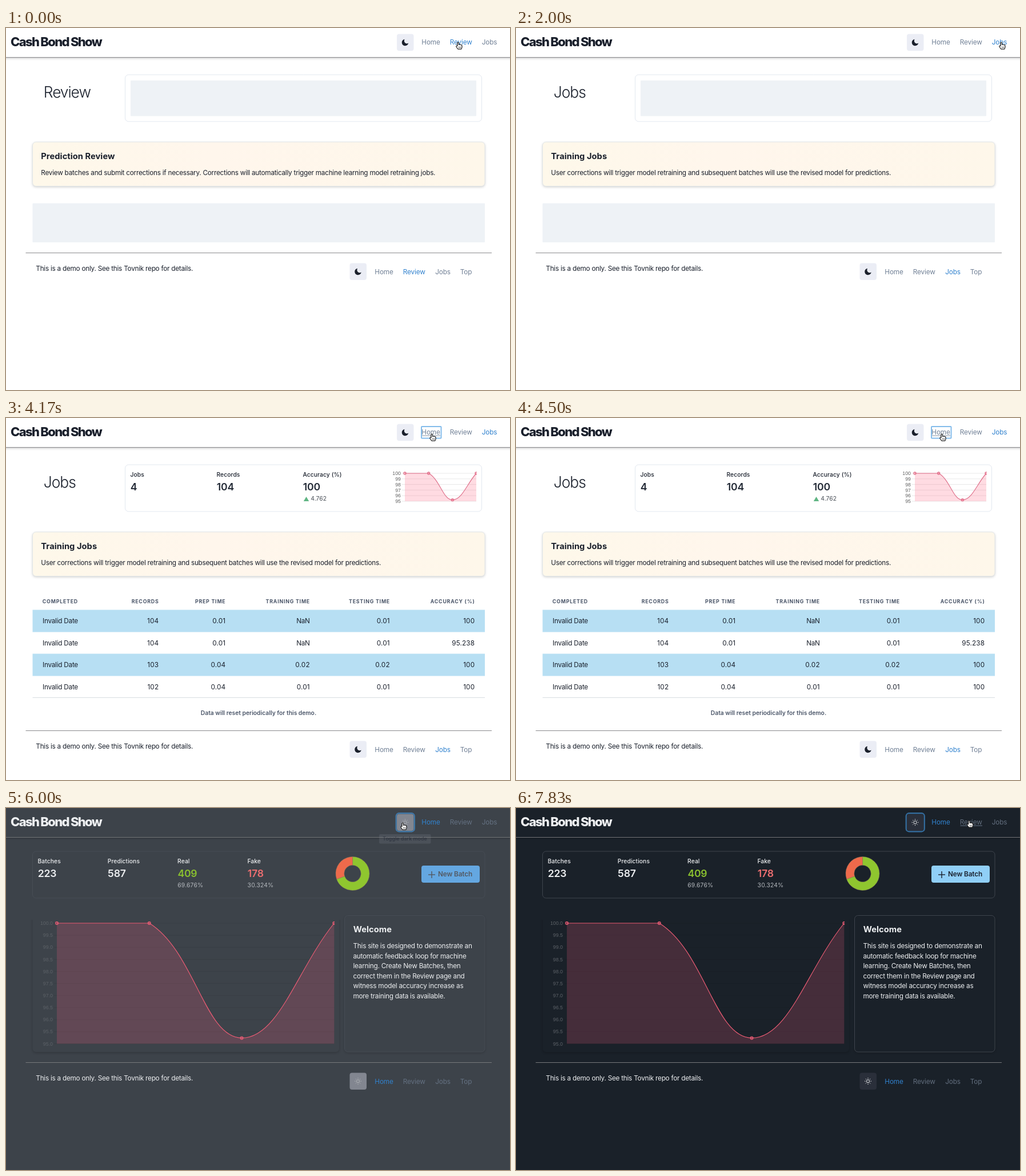
An HTML page with a canvas for the animation above (8 s loop, 882 by 635 pixels).

```html
<!DOCTYPE html>
<html lang="en">
<head>
<meta charset="utf-8">
<title>Cash Bond Show</title>
<style>
  html, body { margin: 0; width: 100%; height: 100%; overflow: hidden; background: #fff; }
  canvas { display: block; width: 882px; height: 635px; }
</style>
</head>
<body>
<canvas id="stage" width="882" height="635"></canvas>
<script>
const ctx = document.getElementById('stage').getContext('2d');
const LOOP = 8000, STEP = 1000 / 6;
const REVIEW_READY = 365, JOBS_OPEN = 1940, JOBS_READY = 2300, HOME_OPEN = 4510, DARK_AT = 5870;
const UI = 'Inter, "Open Sans", sans-serif';
const CHART_FONT = '"Liberation Sans", Arial, sans-serif';
const BODY = 11.76, SMALL = 10.29, TINY = 8.82;
const TRACK = -0.245, DIGIT_TRACK = 0.15;
const HAND = new Path2D('M-2.8 1L-2.8 -5Q-1.8 -6.6 -.8 -5L-.8 -1.5Q2 -2.4 4.6 -.6Q5.4 2.5 3.6 5.8L-2 5.8Q-4 3.2 -5 1.2Q-4.6 -.4 -2.8 1Z');
const FINGERS = new Path2D('M-.6 1.6L-.6 4.2M1 1.6L1 4.2M2.6 1.6L2.6 4.2');
const ARROW = new Path2D('M-2 -5L-2 4.5L.2 2.4L1.9 6L3.4 5.4L1.8 1.9L4.8 1.9Z');
const CURSOR_PATH = [
  [0, 793, 31], [700, 793, 31], [1000, 851, 31], [1170, 851, 31], [1400, 864, 13],
  [1700, 851, 31], [3200, 851, 31], [3600, 800, 30], [3950, 747, 34], [5000, 747, 34],
  [5170, 717, 32], [5400, 696, 32], [7200, 696, 32], [7700, 796, 28], [8000, 796, 28]
];
const ACCURACY = [100, 100, 95.238, 100];
const LINKS = { Home: [728, 760], Review: [777.5, 816], Jobs: [833.5, 859] };

// Per-frame theme state
let now = 0, dark = false, bgMix = 0, btnMix = 0;

const clamp = v => Math.max(0, Math.min(1, v));
const soft = u => 1 - Math.pow(1 - clamp(u), 2.4);
const outQuart = u => 1 - Math.pow(1 - clamp(u), 4);
const mix = (a, b, k) => `rgb(${a.map((v, i) => Math.round(v + (b[i] - v) * k))})`;
const ink = () => dark ? '#edeff1' : '#1a202c';
const edge = () => dark ? mix([120, 125, 132], [62, 68, 77], bgMix) : '#e2e8f0';
const pageFill = () => mix([255, 255, 255], [26, 33, 41], bgMix);

function text(str, x, y, o = {}) {
  ctx.font = `${o.weight || 400} ${o.size || BODY}px ${o.family || UI}`;
  ctx.letterSpacing = `${o.track === undefined ? TRACK : o.track}px`;
  ctx.textAlign = o.align || 'left';
  ctx.fillStyle = o.color || ink();
  ctx.fillText(str, x, y);
}

function box(x0, y0, x1, y1, r, fill, stroke, width = 1) {
  ctx.beginPath();
  ctx.roundRect(x0, y0, x1 - x0, y1 - y0, r);
  if (fill) { ctx.fillStyle = fill; ctx.fill(); }
  if (stroke) { ctx.strokeStyle = stroke; ctx.lineWidth = width; ctx.stroke(); }
}

function shadowBox(...args) {
  ctx.save();
  ctx.shadowColor = 'rgba(0,0,0,0.2)';
  ctx.shadowBlur = 4;
  ctx.shadowOffsetY = 1.5;
  box(...args);
  ctx.restore();
}

function hline(x0, x1, y, color, width = 1) {
  ctx.fillStyle = color;
  ctx.fillRect(x0, y - width / 2, x1 - x0, width);
}

function faded(alpha, draw) {
  ctx.save();
  ctx.globalAlpha = alpha;
  draw();
  ctx.restore();
}

function cursorAt(t) {
  let i = 1;
  while (i < CURSOR_PATH.length - 1 && CURSOR_PATH[i][0] < t) i++;
  const [t0, x0, y0] = CURSOR_PATH[i - 1], [t1, x1, y1] = CURSOR_PATH[i];
  const u = clamp((t - t0) / (t1 - t0)), e = u * u * (3 - 2 * u);
  return [x0 + (x1 - x0) * e, y0 + (y1 - y0) * e];
}

function linkUnder([x, y]) {
  if (y < 17 || y > 40) return '';
  return Object.keys(LINKS).find(n => x >= LINKS[n][0] && x <= LINKS[n][1] + 1) || '';
}

function moon(x, y) {
  ctx.beginPath();
  ctx.arc(x, y + 0.2, 5.8, -1.75, 0.2, true);
  ctx.bezierCurveTo(x + 2.5, y + 3.4, x - 3.6, y + 0.6, x - 1, y - 5.5);
  ctx.fillStyle = '#1a202c';
  ctx.fill();
}

function sun(x, y) {
  ctx.strokeStyle = mix([104, 108, 114], [240, 242, 244], btnMix);
  ctx.lineWidth = 1;
  ctx.beginPath();
  ctx.arc(x, y, 2.6, 0, 7);
  for (let i = 0; i < 8; i++) {
    const c = Math.cos(i * Math.PI / 4), s = Math.sin(i * Math.PI / 4);
    ctx.moveTo(x + c * 4.4, y + s * 4.4);
    ctx.lineTo(x + c * 5.9, y + s * 5.9);
  }
  ctx.stroke();
}

function toggle(x, y) {
  box(x, y, x + 29.5, y + 29.5, 4, mix([235, 237, 245], [42, 47, 58], btnMix));
  (dark ? sun : moon)(x + 14.5, y + 14.7);
}

function navLink(name, x, y, active) {
  const gray = mix([113, 128, 150], [98, 110, 126], bgMix);
  text(name, x, y, { color: active ? '#3182ce' : gray, track: -0.15 });
}

function header(page) {
  ctx.save();
  ctx.shadowColor = 'rgba(0,0,0,0.25)';
  ctx.shadowBlur = 4;
  ctx.shadowOffsetY = 1;
  ctx.fillStyle = pageFill();
  ctx.fillRect(-8, -8, 898, 59.5);
  ctx.restore();
  hline(0, 882, 51.5, dark ? '#737578' : '#8c8c8f');
  text('Cash Bond Show', 8, 32, { size: 22, weight: 800, track: -1.68 });
  toggle(684, 10.5);
  const hover = linkUnder(cursorAt(now - 100));
  for (const name in LINKS) {
    const [x0, x1] = LINKS[name], active = name === page;
    navLink(name, x0 - 0.7, 29, active);
    if (name === hover && (!active || name === 'Home')) {
      hline(x0, x1, 31, active ? '#3182ce' : '#718096', 0.9);
    }
  }
  const ring = 'rgba(66,153,225,0.65)';
  if (now > 4050 && now < HOME_OPEN) box(727, 15, 761.5, 35.5, 1, null, ring, 2);
  if (now > 5850) box(682.7, 9.2, 714.8, 41.3, 5, null, ring, 2.2);
}

function footer(page, y) {
  hline(34.5, 850, y, dark ? '#77797b' : '#8a8a8d');
  text('This is a demo only. See this Tovnik repo for details.', 52.3, y + 31);
  toggle(601.5, y + 18);
  [['Home', 645.3], ['Review', 694.8], ['Jobs', 751.2], ['Top', 794.8]]
    .forEach(([n, x]) => navLink(n, x, y + 37, n === page));
}

function skeletons(since) {
  const color = mix([242, 246, 249], [189, 198, 211], clamp((now - since) / 800));
  box(218, 92, 823, 154.5, 1, color);
  box(46.5, 307.5, 838, 376, 1, color);
}

function intro(page, heading, body) {
  text(page, 65.8, 122, { size: 26.4, weight: 300, track: -1.05 });
  box(208.5, 82, 832.5, 164, 6, null, '#e2e8f0');
  const g = ctx.createLinearGradient(46, 0, 838, 0);
  g.addColorStop(0, '#fef8ea');
  g.addColorStop(0.4, '#fff6ec');
  g.addColorStop(1, '#fef7ea');
  shadowBox(46.5, 200, 838, 277.5, 6, g);
  box(46.5, 200, 838, 277.5, 6, null, '#dbe2e6', 0.8);
  text(heading, 61.3, 230, { size: 14.7, weight: 700, track: 0.04 });
  text(body, 61.3, 257.5);
}

function stat(label, value, x, top, color, note) {
  text(label, x - 0.5, top + 21, { size: SMALL, weight: 500, track: 0.08 });
  text(value, x - 0.2, top + 45, { size: 17.64, weight: 600, track: -0.2, color: color || (dark ? '#edeff1' : '#232a36') });
  if (note) text(note, x - 0.3, top + 63, { size: SMALL, track: 0.18, color: dark ? '#b4b8bd' : '#4a5058' });
}

function batchStats(x, gap, top) {
  stat('Batches', '223', x, top);
  stat('Predictions', '587', x + gap, top);
  stat('Real', '409', x + gap * 2, top, '#8ac02f', '69.676%');
  stat('Fake', '178', x + gap * 3, top, '#ec6e70', '30.324%');
}

function donut(x, y, sweep) {
  let from = -Math.PI / 2;
  [[0.69676, '#8fc62f'], [0.30324, '#ee6a4b']].forEach(([share, color]) => {
    const to = from + share * sweep * Math.PI * 2;
    ctx.beginPath();
    ctx.arc(x, y, 29.5, from, to);
    ctx.arc(x, y, 14.7, to, from, true);
    ctx.closePath();
    ctx.fillStyle = color;
    ctx.fill();
    ctx.strokeStyle = dark ? 'rgba(140,125,95,0.6)' : 'rgba(90,90,95,0.75)';
    ctx.lineWidth = 0.8;
    ctx.stroke();
    from = to;
  });
}

// Spline handles on either side of b, held inside the plot
function handles(a, b, c, y0, y1) {
  const d1 = Math.hypot(b[0] - a[0], b[1] - a[1]), d2 = Math.hypot(c[0] - b[0], c[1] - b[1]);
  const k1 = 0.4 * d1 / (d1 + d2 || 1), k2 = 0.4 * d2 / (d1 + d2 || 1);
  const hold = y => Math.max(y0, Math.min(y1, y));
  const dx = c[0] - a[0], dy = c[1] - a[1];
  return [[b[0] - k1 * dx, hold(b[1] - k1 * dy)], [b[0] + k2 * dx, hold(b[1] + k2 * dy)]];
}

function lineChart(x0, y0, x1, y1, step, digits, radius, grow) {
  for (let v = 100; v >= 95; v -= step) {
    const y = y0 + (100 - v) / 5 * (y1 - y0);
    hline(x0 - 5, x1, y, 'rgba(0,0,0,0.1)', 0.9);
    text(v.toFixed(digits), x0 - 7, y + 3.1, { size: TINY, family: CHART_FONT, track: 0, align: 'right', color: dark ? '#5c6167' : '#666' });
  }
  const pts = ACCURACY.map((v, i) => [x0 + (x1 - x0) * i / 3, y1 - (v - 95) / 5 * (y1 - y0) * grow]);
  const cps = pts.map((p, i) => handles(pts[i - 1] || p, p, pts[i + 1] || p, y0, y1));
  const trace = () => {
    ctx.moveTo(...pts[0]);
    for (let i = 1; i < pts.length; i++) ctx.bezierCurveTo(...cps[i - 1][1], ...cps[i][0], ...pts[i]);
  };
  ctx.save();
  ctx.beginPath();
  ctx.rect(x0 - 6, y0 - 6, x1 - x0 + 6.8, y1 - y0 + 12);
  ctx.clip();
  ctx.beginPath();
  trace();
  ctx.lineTo(x1, y1);
  ctx.lineTo(x0, y1);
  ctx.fillStyle = `rgba(255,99,132,${dark ? 0.19 : 0.23})`;
  ctx.fill();
  ctx.strokeStyle = dark ? '#ea5b73' : '#df6f8a';
  ctx.lineWidth = 1.15;
  ctx.beginPath();
  trace();
  ctx.stroke();
  ctx.fillStyle = 'rgba(255,99,132,0.3)';
  for (const p of pts) {
    ctx.beginPath();
    ctx.arc(...p, radius, 0, 7);
    ctx.fill();
    ctx.stroke();
  }
  ctx.restore();
}

function table(heads, rights, rows, stripe) {
  const place = i => i ? [rights[i - 1], 'right'] : [63.5, 'left'];
  heads.forEach((h, i) => {
    const [x, align] = place(i);
    text(h, x + (i ? 0.5 : 0.3), 325, { size: TINY, weight: 700, track: 0.78, align, color: '#4a5568' });
  });
  rows.forEach((row, r) => {
    const y = 336.5 + r * 38.5;
    if (r % 2 === 0) box(46.5, y, 838, y + 39, 0, stripe);
    row.forEach((cell, i) => {
      const [x, align] = place(i);
      const track = /\d/.test(cell) ? DIGIT_TRACK : TRACK;
      text(cell, x + (i ? 0.2 : 0.5), y + 23.6, { align, track });
    });
  });
}

function reviewPage() {
  intro('Review', 'Prediction Review',
    'Review batches and submit corrections if necessary. Corrections will automatically trigger machine learning model retraining jobs.');
  if (now < REVIEW_READY) {
    skeletons(-60);
    footer('Review', 394.5);
    return;
  }
  const age = now - REVIEW_READY;
  faded(soft(age / 350), () => {
    batchStats(218, 121, 82);
    donut(762, 121, outQuart(age / 1000));
    const rows = [35, 34, 33, 32, 31, 29, 29, 28].map(s => [`12/29/2020, 3:37:${s} PM`, '15', '12', '3']);
    table(['SUBMITTED', 'PREDICTIONS', 'REAL', 'FAKE', 'REVIEW'], [489, 592, 694.5, 820], rows, '#b7dff3');
  });
}

function jobsPage() {
  intro('Jobs', 'Training Jobs',
    'User corrections will trigger model retraining and subsequent batches will use the revised model for predictions.');
  if (now < JOBS_READY) {
    skeletons(JOBS_OPEN);
    footer('Jobs', 394.5);
    return;
  }
  const age = now - JOBS_READY;
  faded(soft(age / 350), () => {
    stat('Jobs', '4', 218, 82);
    stat('Records', '104', 369, 82);
    stat('Accuracy (%)', '100', 520, 82);
    ctx.beginPath();
    ctx.moveTo(525.5, 138);
    ctx.lineTo(530.2, 146);
    ctx.lineTo(520.8, 146);
    ctx.fillStyle = '#5fb583';
    ctx.fill();
    text('4.762', 533.3, 145, { size: SMALL, track: 0.1, color: '#4a5058' });
    lineChart(698, 97, 823, 146, 1, 0, 2.1, outQuart(age / 1000));
    table(['COMPLETED', 'RECORDS', 'PREP TIME', 'TRAINING TIME', 'TESTING TIME', 'ACCURACY (%)'],
      [267, 384, 531.5, 671.5, 820], [
        ['Invalid Date', '104', '0.01', 'NaN', '0.01', '100'],
        ['Invalid Date', '104', '0.01', 'NaN', '0.01', '95.238'],
        ['Invalid Date', '103', '0.04', '0.02', '0.02', '100'],
        ['Invalid Date', '102', '0.04', '0.01', '0.01', '100']
      ], '#b7dff3');
    hline(46.5, 838, 490.5, '#d8dce1');
    text('Data will reset periodically for this demo.', 442, 520.5,
      { size: SMALL, weight: 600, track: 0, align: 'center', color: '#4a5568' });
  });
  footer('Jobs', 548.5);
}

function homePage() {
  const age = now - HOME_OPEN, grow = outQuart(age / 1000);
  box(46.5, 76, 838, 158, 6, null, edge());
  ctx.save();
  ctx.beginPath();
  ctx.rect(40, 196, 550, 240);
  ctx.clip();
  shadowBox(46.5, 188.5, 583, 428, 6, pageFill());
  ctx.restore();
  shadowBox(592.5, 188.5, 838, 428, 6, pageFill());
  box(592.5, 188.5, 838, 428, 6, null, edge());

  faded(soft(age / 350), () => {
    batchStats(56, 122.3, 76);
    donut(606.5, 115, grow);
    lineChart(89, 202, 574.3, 413.5, 0.5, 1, 2.4, grow);
  });

  box(727, 101, 829, 131, 4, mix([47, 120, 200], [144, 207, 247], btnMix));
  const label = mix([255, 255, 255], [26, 32, 44], dark ? Math.max(btnMix, 0.75) : 0);
  hline(739, 751, 117, label, 1.4);
  ctx.fillRect(744.3, 111, 1.4, 12);
  text('New Batch', 756, 120, { weight: 600, track: -0.12, color: label });

  text('Welcome', 607.7, 218, { size: 14.7, weight: 700, track: 0.04 });
  [
    'This site is designed to demonstrate an',
    'automatic feedback loop for machine',
    'learning. Create New Batches, then',
    'correct them in the Review page and',
    'witness model accuracy increase as',
    'more training data is available.'
  ].forEach((line, i) => text(line, 607.5, 246 + i * 17.5));
  footer('Home', 446.5);
}

function tooltip() {
  const alpha = dark ? 0.18 * clamp((6100 - now) / 100) : clamp((now - 5400) / 150);
  if (!alpha) return;
  faded(alpha, () => {
    box(653, 46, 743.5, 62.5, 2, dark ? '#8d939c' : '#2d3748');
  });
  faded(dark ? alpha * 3 : alpha, () => {
    text('Toggle dark mode', 698, 57.3, { size: TINY, weight: 500, track: 0.08, align: 'center', color: dark ? '#1a202c' : '#fff' });
  });
}

function cursor() {
  const pos = cursorAt(now);
  const pointing = linkUnder(pos) || pos[0] < 714;
  ctx.save();
  ctx.translate(...pos);
  ctx.lineWidth = 1.6;
  ctx.lineJoin = 'round';
  ctx.strokeStyle = pointing ? '#111' : '#fff';
  ctx.fillStyle = pointing ? '#fff' : '#111';
  const shape = pointing ? HAND : ARROW;
  ctx.stroke(shape);
  ctx.fill(shape);
  if (pointing) {
    ctx.lineWidth = 0.6;
    ctx.stroke(HAND);
    ctx.stroke(FINGERS);
  }
  ctx.restore();
}

function draw() {
  now = Math.floor((performance.now() % LOOP) / STEP) * STEP;
  dark = now >= DARK_AT;
  btnMix = clamp((now - DARK_AT) / 240);
  bgMix = soft(btnMix);
  ctx.fillStyle = pageFill();
  ctx.fillRect(0, 0, 882, 635);

  const page = now < JOBS_OPEN ? 'Review' : now < HOME_OPEN ? 'Jobs' : 'Home';
  ({ Review: reviewPage, Jobs: jobsPage, Home: homePage })[page]();
  header(page);
  tooltip();
  cursor();
  requestAnimationFrame(draw);
}
draw();
</script>
</body>
</html>
```
